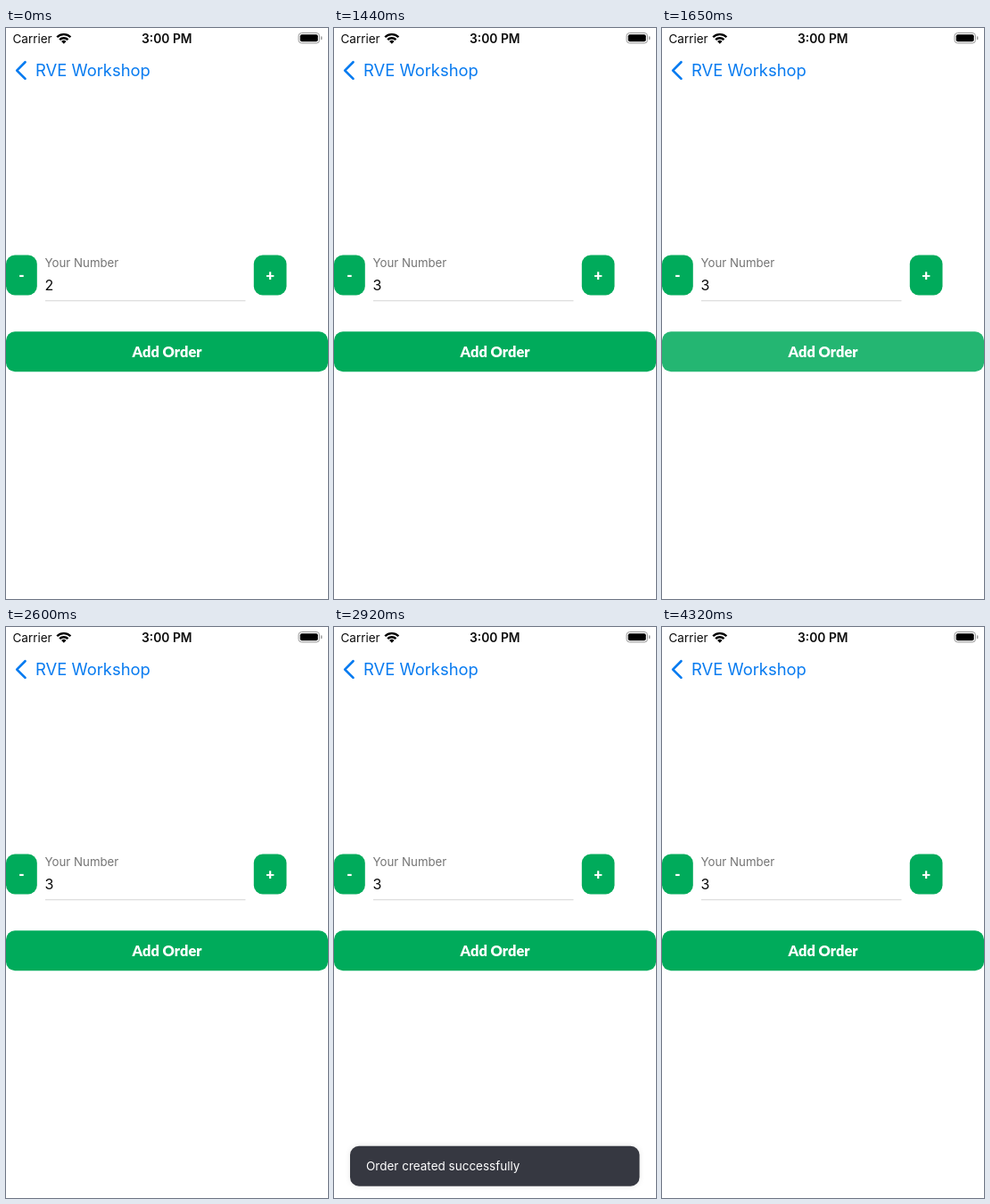
These frames come from a looping animation (361x640 px, 4.34 s). An HTML page with a canvas:

```html
<!DOCTYPE html>
<html lang="en">
<head>
<meta charset="utf-8">
<style>
  html, body { margin: 0; width: 100%; height: 100%; overflow: hidden; background: #fff; }
  canvas { display: block; width: 361px; height: 640px; }
</style>
</head>
<body>
<canvas id="stage"></canvas>
<script>
const W = 361, H = 640, LOOP = 4340;
const GREEN = '#00ab5b', BLUE = '#087bf0', INK = '#0b0b0b';
const UI = 'Inter, sans-serif', LABEL = 'Lato, sans-serif';

const canvas = document.getElementById('stage');
const ctx = canvas.getContext('2d');
const dpr = window.devicePixelRatio || 1;
canvas.width = W * dpr;
canvas.height = H * dpr;
ctx.scale(dpr, dpr);

// Each track is a list of [start ms, value]; values hold until the next start.
const count = [[0, 2], [640, 3]];
const plusAlpha = [[0, 1], [640, 0.7], [740, 0.86], [1440, 1]];
const orderAlpha = [[0, 1], [1550, 0.75], [1650, 0.86], [2600, 1]];
const toastShown = [[0, 0], [2710, 0.3], [2820, 0.85], [2920, 1],
                    [4120, 0.8], [4220, 0.25], [4320, 0]];

function valueAt(track, t) {
  let value = track[0][1];
  for (const [start, v] of track) if (t >= start) value = v;
  return value;
}

function text(str, x, y, font, color, align = 'left') {
  ctx.font = font;
  ctx.fillStyle = color;
  ctx.textAlign = align;
  ctx.fillText(str, x, y);
}

function box(x, y, w, h, r, color) {
  ctx.beginPath();
  ctx.roundRect(x, y, w, h, r);
  ctx.fillStyle = color;
  ctx.fill();
}

function button(label, x, y, w, alpha, size) {
  ctx.globalAlpha = alpha;
  box(x, y, w, 45, 10, GREEN);
  ctx.globalAlpha = 1;
  text(label, x + w / 2, y + 28.5, `900 ${size}px ${LABEL}`, '#fff', 'center');
}

function wifi(cx, cy) {
  const from = -Math.PI * 0.75, to = -Math.PI * 0.25;
  ctx.strokeStyle = '#000';
  ctx.lineWidth = 2.4;
  ctx.lineCap = 'butt';
  for (const r of [6.6, 10.7]) {
    ctx.beginPath();
    ctx.arc(cx, cy, r, from, to);
    ctx.stroke();
  }
  ctx.beginPath();
  ctx.moveTo(cx, cy);
  ctx.arc(cx, cy, 3.9, from, to);
  ctx.fillStyle = '#000';
  ctx.fill();
}

function battery() {
  ctx.beginPath();
  ctx.roundRect(328, 5.5, 23.5, 11.5, 3.5);
  ctx.strokeStyle = '#9a9a9a';
  ctx.lineWidth = 1;
  ctx.stroke();
  box(329.7, 7.2, 20, 8, 2, '#000');
  box(353, 9.2, 1.4, 4, 0.7, '#9a9a9a');
}

function header() {
  text('Carrier', 7.5, 16.5, `13.5px ${UI}`, INK);
  wifi(64.8, 17.8);
  text('3:00 PM', 180.3, 16.5, `600 13.8px ${UI}`, INK, 'center');
  battery();

  ctx.beginPath();
  ctx.moveTo(21.5, 38.3);
  ctx.lineTo(12.2, 47.6);
  ctx.lineTo(21.5, 56.9);
  ctx.strokeStyle = BLUE;
  ctx.lineWidth = 2.7;
  ctx.lineCap = ctx.lineJoin = 'round';
  ctx.stroke();
  text('RVE Workshop', 33, 54, `18.4px ${UI}`, BLUE);
}

function form(t) {
  button('-', 0, 254.5, 34.8, 1, 17);
  text('Your Number', 43.6, 267.7, `13.25px ${UI}`, '#747474');
  text(valueAt(count, t), 43.6, 294.2, `16px ${UI}`, INK);
  box(44, 305.2, 224.5, 1, 0, '#d4d4d4');
  button('+', 277.8, 254.5, 36.7, valueAt(plusAlpha, t), 17);
  button('Add Order', 0, 340.3, W, valueAt(orderAlpha, t), 16.4);
}

function toast(shown) {
  if (!shown) return;
  ctx.save();
  ctx.translate(0, (1 - shown) * 56);
  ctx.globalAlpha = shown;
  ctx.shadowColor = 'rgba(0, 0, 0, 0.1)';
  ctx.shadowBlur = 6 * dpr;
  box(18, 581.7, 324.5, 45, 10, '#363841');
  // White text stays opaque: the whole bar fades towards a white page.
  ctx.shadowColor = 'transparent';
  ctx.globalAlpha = 1;
  text('Order created successfully', 36, 609, `13.5px ${UI}`, '#fff');
  ctx.restore();
}

function draw(now) {
  const t = now % LOOP;
  ctx.fillStyle = '#fff';
  ctx.fillRect(0, 0, W, H);
  header();
  form(t);
  toast(valueAt(toastShown, t));
  requestAnimationFrame(draw);
}
requestAnimationFrame(draw);
</script>
</body>
</html>
```
